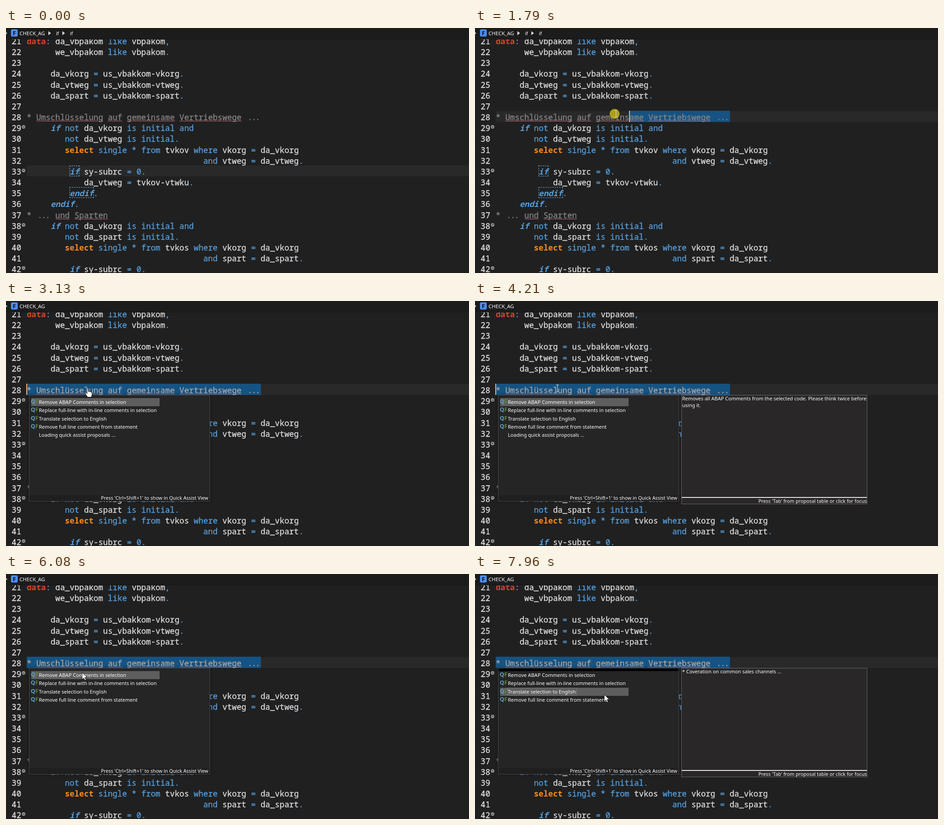
These frames come from a looping animation (1028x545 px, 8000 ms). An HTML page:

```html
<!DOCTYPE html>
<html lang="en">
<head>
<meta charset="utf-8">
<title>Quick assist</title>
<style>
html, body { margin: 0; width: 100%; height: 100%; overflow: hidden; background: #202020; }
.stage { position: relative; width: 1028px; height: 545px; overflow: hidden; background: #202020;
  --row: 24.15px; font: 11.05px "Noto Sans", "Open Sans", sans-serif; color: #fff; }
.stage div, .stage svg, pre { position: absolute; box-sizing: border-box; }
.anim, .anim-all > * { animation: 8s step-end -4ms infinite; }

/* editor */
pre { margin: 0; top: 17px; font: 17.667px/var(--row) "Noto Sans Mono", monospace; color: #dcdcdc; -webkit-text-stroke: .35px; }
pre i { font-style: normal; color: #569fdd; }
pre em { font-weight: bold; color: #569fdd; -webkit-text-stroke: 0; }
pre b { color: #ff8a1c; -webkit-text-stroke: 0; }
pre b.decl { color: #d2472c; }
pre s { text-decoration: none; color: #858585; }
pre u { text-decoration: none; background:
  repeating-linear-gradient(90deg, #c0707c 0 2px, transparent 2px 4px) 0 calc(100% - 3px) / 100% 1px no-repeat,
  repeating-linear-gradient(90deg, transparent 0 2px, #c0707c 2px 4px) 0 calc(100% - 2px) / 100% 1px no-repeat; }
.lit { animation-name: lit; }
.dots { display: inline-block; width: 3ch; letter-spacing: -1.9px; text-align: center; }
.numbers { left: 12.6px; color: #e2e2e2; }
.code { left: 46px; }
.fold { left: 34.5px; top: calc(192px + (var(--n) - 28) * var(--row)); width: 8px; height: 8px;
  border-radius: 50%; background: linear-gradient(#2a2a2a, #2a2a2a) center / 4px 1px no-repeat #8c8c8c; }
.line { left: 46px; right: 0; height: 24px; background: #292929; animation-name: line; }
.selection { top: 184px; right: 462px; height: 25px; background: #165382; animation-name: select; }
.caret { left: -1px; top: 0; width: 2px; height: 25px; background: #efb27c; animation-name: caret; }
.match { left: 141px; height: 24px; border: 1px dashed #74b8ea; }

/* breadcrumb */
.crumbs { left: 0; top: 0; width: 100%; height: 25px; background: #1c1c1d; border-bottom: 1px solid #161616; line-height: 23px; }
.crumbs div { top: 0; }
.crumbs .icon { left: 11px; top: 3px; width: 15px; height: 16px; border-radius: 3px; background: #4c8df0;
  color: #10141c; font-weight: bold; font-size: 13px; line-height: 16px; text-align: center; }
.crumbs .sep { top: 7px; width: 6px; height: 9px; background: #d4d4d4; clip-path: polygon(0 0, 100% 50%, 0 100%); }
.context { animation-name: context; }

/* proposal list */
.popup { left: 51px; top: 209px; width: 402px; height: 237px; background: #252525; border: 1px solid #484848;
  box-shadow: 0 0 6px rgba(0, 0, 0, .4); animation-name: popup; }
.item { left: 4px; top: calc(6px + var(--k) * 18.3px); width: 285px; height: 18px; line-height: 18.3px; padding-left: 17px; white-space: nowrap; }
.item::before, .item::after { position: absolute; top: -1px; font-weight: bold; font-size: 12.5px; }
.item::before { content: "Q"; left: -1px; color: #5f9fd2; }
.item::after { content: "F"; left: 9px; color: #5c8238; }
.item.plain::before, .item.plain::after { content: none; }
.bar { left: 4px; width: 285px; height: 18px; }
.hover { background: #474747; animation-name: hover; }
.picked { background: #5e5e5e; animation-name: picked; }
.focus { left: 20px; top: 43px; width: 154px; height: 17px; border: 1px dotted #999; animation-name: clicked; }
.strip { left: 0; top: 0; width: 400px; height: 6px; background: #000; animation-name: clicked; }
.loading { animation-name: loading; }
.hint { right: 0; bottom: 0; width: 100%; height: 13px; padding-right: 3px; font-size: 10.75px; line-height: 13px;
  text-align: right; background: #1f1f1f; white-space: nowrap; }

/* details */
.details { left: 458px; top: 209px; width: 413px; height: 243px; background: #292728; border: 1px solid #686868; animation-name: details; }
.details .text { left: 1px; top: 0; line-height: 14.6px; white-space: nowrap; }
.old { animation-name: old; }
.new { animation-name: new; }
.details .hint { height: 15px; padding-right: 0; line-height: 14px; background: none; border-top: 2px solid #e6e6e6; }

/* pointer, origin at the hot spot */
.pointer { left: 0; top: 0; width: 0; height: 0; animation-name: move; }
.pointer svg { left: -20px; top: -20px; width: 50px; height: 50px; overflow: visible; }
.press { animation-name: press; }
.beam { animation-name: beam; }
.hand { animation-name: hand; }
.back { animation-name: back; }
.arrow { animation-name: arrow; }

@keyframes line { 0% { top: 306px } 18.875%, 100% { top: 185px } }
@keyframes lit { 0% { color: #858585 } 25%, 100% { color: #a6a6a6 } }
@keyframes select {
  0% { left: 565.4px; opacity: 0 }
  18.875% { left: 565.4px; opacity: 1 }
  20.625% { left: 512.4px }
  21.5% { left: 427.6px }
  22.375% { left: 342.8px; animation-timing-function: steps(7) }
  28.375%, 100% { left: 46px; opacity: 1 }
}
@keyframes caret {
  0%, 18.875%, 39.125%, 52.625%, 65.875%, 79.125% { opacity: 1 }
  32.5%, 45.875%, 59.25%, 72.5%, 86.125%, 100% { opacity: 0 }
}
@keyframes context { 0% { opacity: 1 } 34.25%, 100% { opacity: 0 } }
@keyframes popup { 0% { opacity: 0 } 39.125%, 100% { opacity: 1 } }
@keyframes loading { 0% { opacity: 1 } 69.125%, 100% { opacity: 0 } }
@keyframes details { 0%, 69.125% { opacity: 0 } 45.875%, 76.75%, 100% { opacity: 1 } }
@keyframes hover {
  0% { top: 24.3px; opacity: 0 }
  77.675% { top: 24.3px; opacity: 1 }
  80.2625% { top: 42.6px; opacity: 1 }
  86.125%, 100% { top: 42.6px; opacity: 0 }
}
@keyframes picked { 0% { top: 6px } 86.125%, 100% { top: 42.6px } }
@keyframes clicked { 0% { opacity: 0 } 86.125%, 100% { opacity: 1 } }
@keyframes old { 0% { opacity: 1 } 94.5%, 100% { opacity: 0 } }
@keyframes new { 0% { opacity: 0 } 94.5%, 100% { opacity: 1 } }
@keyframes press { 0%, 29.125%, 88.625%, 100% { opacity: 0 } 18.875%, 86.125% { opacity: 1 } }
@keyframes beam { 0%, 29.125%, 36%, 75.1%, 100% { opacity: 0 } 6%, 32.5%, 40% { opacity: 1 } }
@keyframes hand { 0%, 40%, 100% { opacity: 0 } 36% { opacity: 1 } }
@keyframes back { 0%, 32.5%, 100% { opacity: 0 } 29.125% { opacity: 1 } }
@keyframes arrow { 0% { opacity: 0 } 75.1%, 100% { opacity: 1 } }
@keyframes move {
  0% { transform: translate(817px, 485px) }
  6% { transform: translate(817px, 485px); animation-timing-function: steps(4) }
  9.4375% { transform: translate(690px, 330px); animation-timing-function: steps(7) }
  15.5% { transform: translate(590px, 199px) }
  18.875% { transform: translate(590px, 199px); animation-timing-function: steps(3) }
  21.5% { transform: translate(348px, 192px) }
  22.375% { transform: translate(313px, 191px); animation-timing-function: steps(7) }
  28.375% { transform: translate(38px, 197px) }
  29.125% { transform: translate(33px, 196px) }
  32.5% { transform: translate(60px, 200px) }
  33.375% { transform: translate(140px, 200px) }
  34.25% { transform: translate(205px, 198px) }
  35.125% { transform: translate(190px, 196px) }
  36% { transform: translate(183px, 194px) }
  73.375% { transform: translate(183px, 194px); animation-timing-function: steps(9) }
  81.125% { transform: translate(141px, 269px) }
  82% { transform: translate(142px, 267px) }
  82.875% { transform: translate(143px, 267px) }
  90.375% { transform: translate(144px, 266px) }
  91.125% { transform: translate(144px, 265px) }
  98.625% { transform: translate(215px, 267px) }
  99.5%, 100% { transform: translate(287px, 268px) }
}
</style>
</head>
<body>
<div class="stage">
  <div class="line anim"></div>
  <div class="selection anim"></div>
<pre class="numbers">21
22
23
24
25
26
27
28
29
30
31
32
33
34
35
36
37
38
39
40
41
42</pre>
<pre class="code"><b class="decl">data</b><i>:</i> da_vbpakom <i>like</i> vbpakom<i>,</i>
      we_vbpakom <i>like</i> vbpakom<i>.</i>

     da_vkorg <i>=</i> us_vbakkom-vkorg<i>.</i>
     da_vtweg <i>=</i> us_vbakkom-vtweg<i>.</i>
     da_spart <i>=</i> us_vbakkom-spart<i>.</i>

<s class="lit anim">* <u>Umschlüsselung</u> <u>auf</u> <u>gemeinsame</u> <u>Vertriebswege</u> <span class="dots">...</span></s>
     <em>if</em> <i>not</i> da_vkorg <i>is initial and</i>
        <i>not</i> da_vtweg <i>is initial.</i>
        <b>select</b> <i>single * from</i> tvkov <i>where</i> vkorg <i>=</i> da_vkorg
                                     <i>and</i> vtweg <i>=</i> da_vtweg<i>.</i>
         <em>if</em> sy-subrc <i>= 0.</i>
            da_vtweg <i>=</i> tvkov-vtwku<i>.</i>
         <em>endif</em><i>.</i>
     <em>endif</em><i>.</i>
<s>* <span class="dots">...</span> <u>und</u> <u>Sparten</u></s>
     <em>if</em> <i>not</i> da_vkorg <i>is initial and</i>
        <i>not</i> da_spart <i>is initial.</i>
        <b>select</b> <i>single * from</i> tvkos <i>where</i> vkorg <i>=</i> da_vkorg
                                     <i>and</i> spart <i>=</i> da_spart<i>.</i>
         <em>if</em> sy-subrc <i>= 0.</i></pre>
  <div class="fold" style="--n:29"></div>
  <div class="fold" style="--n:33"></div>
  <div class="fold" style="--n:38"></div>
  <div class="fold" style="--n:42"></div>
  <div class="selection anim" style="background:none"><div class="caret anim"></div></div>
  <div class="context anim">
    <div class="match" style="top:306px;width:22px"></div>
    <div class="match" style="top:354px;width:54px"></div>
  </div>

  <div class="crumbs">
    <div class="sep" style="left:-3px"></div>
    <div class="icon">F</div>
    <div style="left:30px;font-size:11.4px">CHECK_AG</div>
    <div class="context anim">
      <div class="sep" style="left:94px"></div>
      <div style="left:111px">if</div>
      <div class="sep" style="left:125px"></div>
      <div style="left:142px">if</div>
    </div>
  </div>

  <div class="popup anim">
    <div class="bar hover anim"></div>
    <div class="bar picked anim"></div>
    <div class="focus anim"></div>
    <div class="strip anim"></div>
    <div class="item" style="--k:0">Remove ABAP Comments in selection</div>
    <div class="item" style="--k:1">Replace full-line with in-line comments in selection</div>
    <div class="item" style="--k:2">Translate selection to English</div>
    <div class="item" style="--k:3">Remove full line comment from statement</div>
    <div class="item plain loading anim" style="--k:4">Loading quick assist proposals ...</div>
    <div class="hint">Press 'Ctrl+Shift+1' to show in Quick Assist View</div>
  </div>

  <div class="details anim">
    <div class="text old anim">Removes all ABAP Comments from the selected code. Please think twice before<br>using it.</div>
    <div class="text new anim">* Coveration on common sales channels ...</div>
    <div class="hint">Press 'Tab' from proposal table or click for focus</div>
  </div>

  <div class="pointer anim">
    <svg class="anim-all" viewBox="-20 -20 50 50">
      <defs><path id="tip" d="M0 0V15.5L3.6 12.2L6 17.6L8.6 16.5L6.2 11.2H11Z" fill="#fff" stroke="#000" stroke-width=".9"/></defs>
      <circle class="press" cx="-3" r="11" fill="#bdae16" fill-opacity=".88"/>
      <path class="beam" d="M-3 -7.5H-1L0 -6.5L1 -7.5H3M0 -6.5V6.5M-3 7.5H-1L0 6.5L1 7.5H3" fill="none" stroke="#d0d0d0" stroke-width="1.2"/>
      <path class="hand" d="M-3 1Q-3 -.8 -1.5 -.8T0 1V7L5 8Q8 8.6 8 11V15Q8 17 6 20H-2Q-4 16 -6.5 13Q-7.5 11 -6 10.5T-3 12Z" fill="#fff" stroke="#000"/>
      <g class="back"><use href="#tip" transform="scale(-1 1)"/></g>
      <g class="arrow"><use href="#tip"/></g>
    </svg>
  </div>
</div>
</body>
</html>
```
